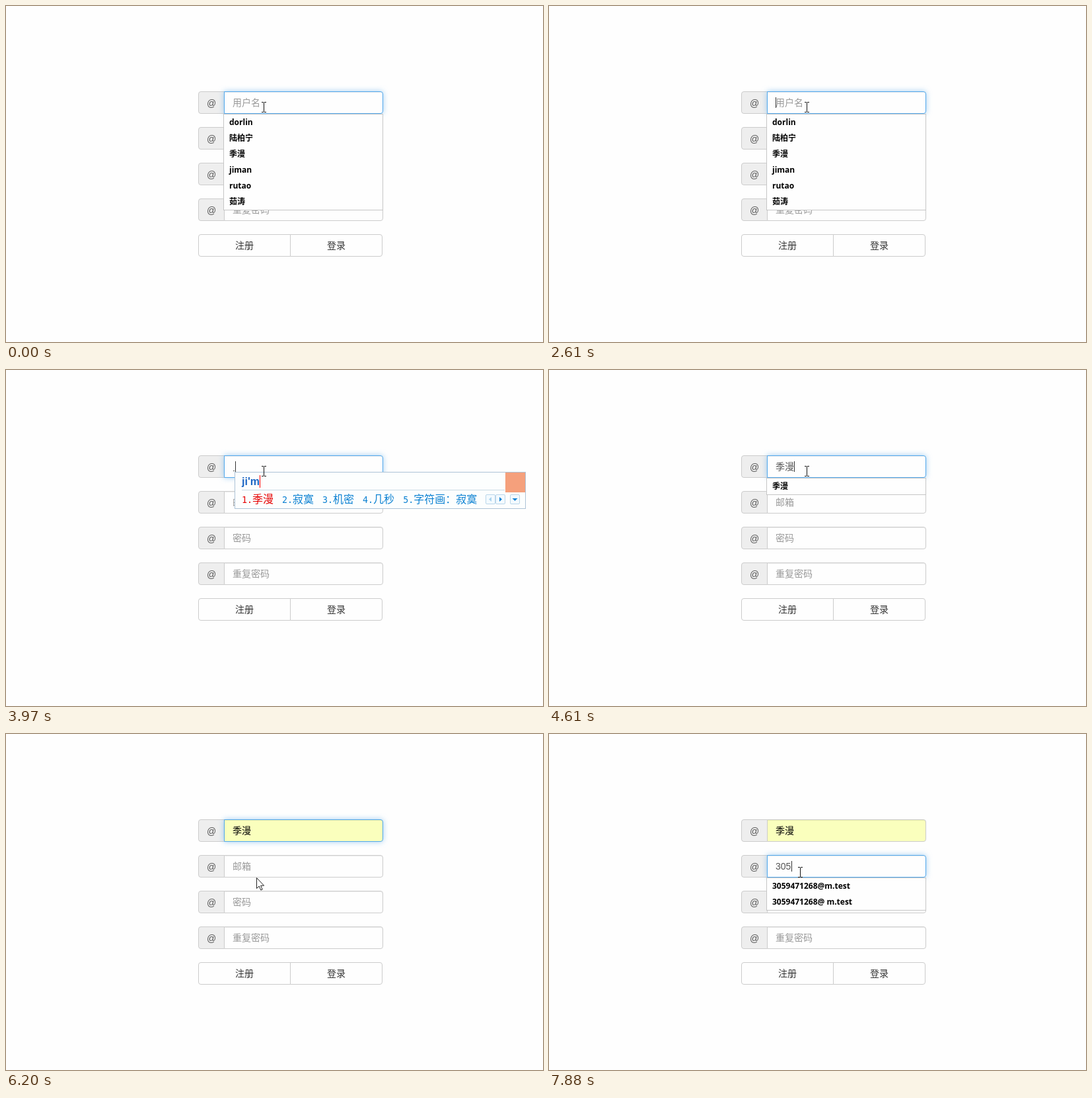
Write an HTML page that moves like this. It is 813 px wide and 508 px high and loops after 8000 ms.

```html
<!DOCTYPE html>
<html lang="zh">
<head>
<meta charset="utf-8">
<title>注册</title>
<style>
html, body { margin: 0; width: 100%; height: 100%; overflow: hidden; background: #fefefe; }
body { position: relative; font: 14px "Liberation Sans", "Noto Sans CJK SC", "Noto Sans CJK", sans-serif; }
div, svg { position: absolute; box-sizing: border-box; white-space: nowrap; }
.addon { border: 1px solid #ccc; border-radius: 4px 0 0 4px; background: #eee; color: #555; text-align: center; line-height: 34px; }
.field { border: 1px solid #ccc; border-radius: 0 4px 4px 0; padding-left: 12px; line-height: 32px; }
.button { border: 1px solid #ccc; color: #333; text-align: center; line-height: 32px; }
.list { border: 1px solid #c6c6c6; background: #fefefe; color: #000; font: bold 12px/24px "Open Sans", "Noto Sans CJK SC", "Noto Sans CJK", sans-serif; }
.list p { margin: 0; padding-left: 8px; height: 24px; line-height: 23px; }
.list .hover { background: #c8c8c8; }
.ime { border: 1px solid #adc3d6; background: #fcfefe; }
.typed { color: #1c66c4; font-weight: bold; font-size: 16px; line-height: 19px; border-right: 1px solid #f00; }
.words { color: #0a80d2; font-size: 16px; line-height: 24px; }
.words span { margin-right: 13px; }
.words span:first-child { color: #e60000; }
.words b { font: 13.3px "DejaVu Sans Mono", monospace; }
.key { border: 1px solid #b9d6ea; border-radius: 2px; background: #f3faff; }
</style>
</head>
<body>
<script>
const LOOP = 8000;
const people = ['dorlin', '陆柏宁', '季漫', 'jiman', 'rutao', '茹涛'];
const mails = ['3059471268@m.test', '3059471268@ m.test', '3174620895@m.test',
  '3482057169@m.test', '3610749258@m.test', '3926180475@m.test'];
const hints = ['用户名', '邮箱', '密码', '重复密码'];

// Each step changes only the listed properties of the state.
const steps = [
  [0, { focus: [1, 0], text: ['', ''], caret: 0, list: people, row: 0, mouse: ['beam', 387, 145] }],
  [530, { caret: 343 }],
  [1120, { caret: 0 }],
  [1500, { caret: 343 }],
  [2080, { caret: 0 }],
  [2610, { caret: 343 }],
  [3190, { caret: 347, list: 0, ime: ['j', '经济 今天 就是 觉得 字符画：鸡'] }],
  [3470, { ime: ['ji', '及 级 几 记 即'] }],
  [3970, { ime: ["ji'm", '季漫 寂寞 机密 几秒 字符画：寂寞'] }],
  [4090, { ime: ["ji'ma", '季漫 挤满 鸡毛 积满 极慢'] }],
  [4240, { ime: ["ji'man", '季漫 挤满 积满 极慢 急慢'] }],
  [4610, { ime: 0, text: ['季漫', ''], caret: 371, list: ['季漫'] }],
  [5140, { caret: 0 }],
  [5410, { hover: 1, filled: 1, mouse: ['arrow', 391, 165] }],
  [5530, { mouse: ['arrow', 390, 168] }],
  [5650, { caret: 371 }],
  [5930, { list: 0, hover: 0 }],
  [6080, { mouse: ['beam', 385, 192] }],
  [6200, { caret: 0, mouse: ['arrow', 379, 217] }],
  [6360, { mouse: ['beam', 377, 201] }],
  [6500, { focus: [0.4, 0.6], row: 1, caret: 343 }],
  [6620, { focus: [0, 1] }],
  [7180, { caret: 0 }],
  [7610, { text: ['季漫', '3'], list: mails, caret: 351 }],
  [7730, { text: ['季漫', '30'], list: mails.slice(0, 2), caret: 359 }],
  [7880, { text: ['季漫', '305'], caret: 367 }]
];

const box = (cls, x, y, w, h, inner = '', css = '') =>
  `<div class="${cls}" style="left:${x}px;top:${y}px;width:${w}px;height:${h}px;${css}">${inner}</div>`;

const mix = (a, b, k) => Math.round(a + (b - a) * k);

function field(s, i) {
  const y = 129 + 54 * i, k = s.focus[i] || 0, value = s.text[i];
  const filled = i === 0 && s.filled;
  const composing = i === 0 && s.ime;
  const css = `border-color:rgb(${mix(204, 82, k)},${mix(204, 168, k)},${mix(204, 236, k)});` +
    `box-shadow:inset 0 1px 1px rgba(0,0,0,.075),0 0 8px rgba(102,175,233,${0.6 * k});` +
    `background:${filled ? '#faffbd' : '#fefefe'};color:${filled ? '#000' : value ? '#555' : '#999'}`;
  return box('addon', 291, y, 40, 34, '@') +
    box('field', 330, y, 241, 34, composing ? '' : value || hints[i], css);
}

function list(s) {
  const rows = s.list.map(v => `<p class="${s.hover ? 'hover' : ''}">${v}</p>`).join('');
  return box('list', 329, 163 + 54 * s.row, 242, 24 * s.list.length + 2, rows);
}

function ime([typed, line]) {
  const words = line.split(' ');
  const w = 217 + 16 * words.join('').length;
  const key = (x, path, color) => box('key', w - x, 33, 15, 15,
    `<svg width="13" height="13" style="left:0;top:0"><path d="${path}" fill="${color}"/></svg>`);
  const inner =
    `<div class="typed" style="left:10px;top:4px">${typed}</div>` +
    box('', 10, 26, w - 43, 1, '', 'background:#c9d9e4') +
    `<div class="words" style="left:10px;top:29px">${
      words.map((v, i) => `<span><b>${i + 1}.</b>${v}</span>`).join('')}</div>` +
    key(62, 'M8 3v7l-4-3.5z', '#a9d3ef') +
    key(47, 'M5 3v7l4-3.5z', '#1585d5') +
    key(25, 'M2.5 5h8l-4 4z', '#1585d5') +
    box('', w - 32, 0, 30, 30, '', 'background:#f5a07c');
  return box('', 344, 152, 2, 1, '', 'background:#555') + box('ime', 346, 154, w + 7, 56, inner)
    .replace(`width:${w + 7}px`, `width:${w}px`);
}

function mouse([kind, x, y]) {
  const shape = kind === 'beam'
    ? '<path d="M0 .5h3m1 0h3M3.5 1v14M0 15.5h3m1 0h3" stroke="#111" fill="none"/>'
    : '<path d="M.5.5v16l3.7-3.5 2.6 6 2.4-1-2.6-5.8h5z" stroke="#222" fill="#fff"/>';
  return `<svg width="13" height="20" style="left:${x}px;top:${y}px">${shape}</svg>`;
}

function draw(s) {
  document.body.innerHTML =
    hints.map((_, i) => field(s, i)).join('') +
    box('button', 291, 345, 140, 34, '注册', 'border-radius:4px 0 0 4px') +
    box('button', 430, 345, 140, 34, '登录', 'border-radius:0 4px 4px 0') +
    (s.caret ? box('', s.caret, 138 + 54 * s.row, 1, 16, '', 'background:#333') : '') +
    (s.list ? list(s) : '') +
    (s.ime ? ime(s.ime) : '') +
    mouse(s.mouse);
}

let shown = 0;
function tick() {
  const t = performance.now() % LOOP;
  const past = steps.filter(([at]) => at <= t);
  if (past.length !== shown) {
    shown = past.length;
    draw(Object.assign({}, ...past.map(step => step[1])));
  }
  requestAnimationFrame(tick);
}
tick();
</script>
</body>
</html>
```
